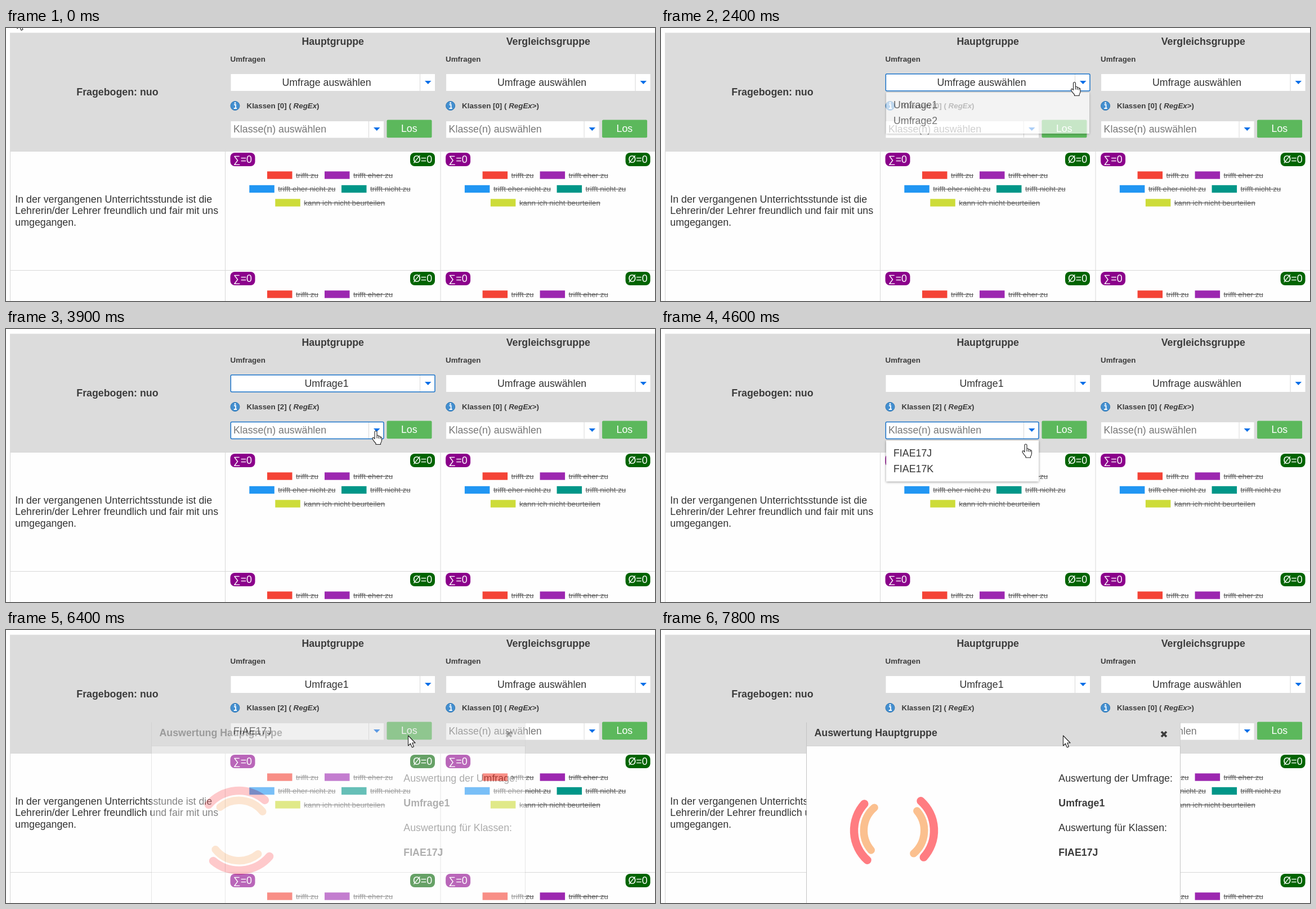
Animation of 1153 by 486 pixels, one loop 8000 ms. Source, as an HTML page:

```html
<!DOCTYPE html>
<html lang="de">
<head>
<meta charset="utf-8">
<style>
  html, body { margin: 0; width: 100%; height: 100%; overflow: hidden; background: #fefefe; }
  svg { display: block; width: 1153px; height: 486px; }
  text { font: 17.8px "Liberation Sans", Arial, sans-serif; fill: #333; white-space: pre; }
  .bold { font-weight: bold; fill: #3c3c3c; }
  .small { font-size: 13.35px; }
  .mid { text-anchor: middle; }
  .white { fill: #fff; }
  .hint { fill: #777; }
  .legend { font-size: 13.35px; fill: #666; }
  .focus { fill: none; stroke: #1a73c9; stroke-width: 1.5; }
  .list > rect:first-child { filter: drop-shadow(0 1px 2px #0006); }
  .cursor { fill: #fff; stroke: #222; stroke-width: 1.1; stroke-linejoin: round; }
  .ring { fill: none; stroke-linecap: round; stroke-dasharray: 1 1; }
</style>
</head>
<body>
<svg id="stage" viewBox="0 0 1153 486"></svg>
<script>
const LOOP = 8000, COLUMN = 382.6, ROW = 212;

const rect = (x, y, w, h, fill, extra = '') =>
  `<rect x="${x}" y="${y}" width="${w}" height="${h}" fill="${fill}" ${extra}/>`;
const text = (x, y, content, cls = '', id = '') =>
  `<text x="${x}" y="${y}" class="${cls}" ${id && `id="${id}"`}>${content}</text>`;
const line = (x1, y1, x2, y2, color = '#d8d8d8') =>
  `<path d="M${x1} ${y1}L${x2} ${y2}" stroke="${color}"/>`;
const group = (x, y, content) => `<g transform="translate(${x} ${y})">${content}</g>`;
const focusBox = (id, x, y, w, h) =>
  `<rect id="${id}" class="focus" x="${x}" y="${y}" width="${w}" height="${h}" rx="2"/>`;

const dropButton = (x, y) =>
  line(x, y - 15, x, y + 15) + `<path d="M${x + 8.5} ${y - 3}h11.5l-5.75 6z" fill="#0a6fe8"/>`;

const badge = (x, color, label) =>
  rect(x, 222, 44, 24, color, 'rx="8"') + text(x + 22, 240, label, 'mid white');

// Each entry: swatch x, row centre, colour, label, label width
const answers = [
  [464, 262, '#f44336', 'trifft zu', 40],
  [566, 262, '#9c27b0', 'trifft eher zu', 70],
  [432.3, 286.5, '#2196f3', 'trifft eher nicht zu', 102],
  [596, 286.5, '#009688', 'trifft nicht zu', 71.5],
  [478.3, 311, '#cddc39', 'kann ich nicht beurteilen', 144],
];
const legend = answers.map(([x, y, color, label, width]) =>
  rect(x, y - 6.7, 44.5, 13.4, color) + text(x + 51, y + 4.5, label, 'legend') +
  rect(x + 51, y - .2, width, 1.3, '#666')).join('');

const cell = badge(398.5, '#8b008b', '∑=0') + badge(718, '#006400', 'Ø=0') + legend;

const panel = (title, key, closing) =>
  text(580.7, 30, title, 'bold mid') +
  text(398.5, 60, 'Umfragen', 'bold small') +
  rect(399.5, 82, 362.5, 30, '#fff') + dropButton(735.5, 97) +
  text(569.5, 102.5, 'Umfrage auswählen', 'mid', 'survey' + key) +
  '<circle cx="407" cy="138.5" r="8" fill="#438fd0" stroke="#2e74b0"/>' +
  '<path d="M405 136.5h3v6.5m-3.2 0h5.2" fill="none" stroke="#fff" stroke-width="1.8"/>' +
  '<circle cx="407" cy="133.4" r="1.4" fill="#fff"/>' +
  text(427.5, 143, `Klassen [<tspan id="count${key}">0</tspan>] ( <tspan font-style="italic">RegEx</tspan>${closing}`, 'bold small') +
  rect(399.5, 166, 271.5, 29.5, '#fff') + dropButton(644.5, 180) +
  text(404, 186.3, 'Klasse(n) auswählen', 'hint', 'class' + key) +
  rect(676.5, 163.5, 80, 31.7, '#5cb85c', 'rx="2"') + text(716.3, 185.2, 'Los', 'mid white');

const list = (id, top, width, items) =>
  `<g id="${id}" class="list">` + rect(400, top, width, 73, '#fff') +
  rect(408, top + 8.5, width - 16, 28, '#e6e6e6', `id="${id}Hover" rx="2"`) +
  items.map((item, i) => text(413, top + 28 + i * 28.3, item)).join('') + '</g>';

const ring = (id, radius, width, color) =>
  `<circle id="${id}" class="ring" r="${radius}" pathLength="4" stroke="${color}" stroke-width="${width}"/>`;

const dialog = '<g id="dialog">' +
  rect(258.5, 165, 664, 340, '#fefefe', 'stroke="#c4c4c4"') +
  rect(259, 163, 663.5, 43, '#dcdcdc') + line(259, 206.5, 922, 206.5, '#d0d0d0') +
  text(272.5, 189, 'Auswertung Hauptgruppe', 'bold') +
  '<path d="M889 181l9 9m0-9l-9 9" stroke="#3c3c3c" stroke-width="3.8"/>' +
  text(706.3, 269.5, 'Auswertung der Umfrage:') + text(706.3, 313.5, 'Umfrage1', 'bold') +
  text(706.3, 357.5, 'Auswertung für Klassen:') + text(706.3, 401.5, 'FIAE17J', 'bold') +
  group(414, 357, ring('outerRing', 71, 14.5, '#ff7c81') + ring('innerRing', 53.7, 13.5, '#fbc08f')) +
  '</g>';

const question = ['In der vergangenen Unterrichtsstunde ist die',
  'Lehrerin/der Lehrer freundlich und fair mit uns', 'umgegangen.'];

document.getElementById('stage').innerHTML =
  rect(0, 0, 1153, 486, '#fefefe') + rect(7, 8.5, 1146, 210.5, '#dcdcdc') +
  [7.5, 389.5, 772].map(x => line(x, 219, x, 486)).join('') +
  line(7, 219.5, 1153, 219.5) + line(7, 431.5, 1153, 431.5) +
  text(125.3, 119.5, 'Fragebogen: nuo', 'bold') +
  question.map((row, i) => text(16.3, 310.5 + i * 20.5, row)).join('') +
  panel('Hauptgruppe', 'A', ')') + group(COLUMN, 0, panel('Vergleichsgruppe', 'B', '&gt;)')) +
  [0, 1].map(c => [0, 1].map(r => group(c * COLUMN, r * ROW, cell)).join('')).join('') +
  focusBox('surveyFocus', 399.3, 81.7, 362.7, 30.3) +
  focusBox('classFocus', 399.3, 165.5, 271.7, 30) +
  list('surveyList', 115, 361, ['Umfrage1', 'Umfrage2']) +
  list('classList', 198.5, 271, ['FIAE17J', 'FIAE17K']) +
  dialog +
  '<path id="arrow" class="cursor" d="M0 0V18L4 14.2L7 21L10 19.7L7.2 13H12.6Z"/>' +
  '<path id="hand" class="cursor" d="M-2 2Q-2 0 0 0T2 2V8Q5 7 5 9.5Q8 8.5 8 11Q10.5 10 10.5 13V17Q10 20 8.5 22V24H0V22Q-4 18 -6 14Q-6 11 -3.5 12.2L-2 14ZM2 8v5M5 9.5v4M8 11v3"/>';

const el = id => document.getElementById(id);

// Tracks hold each value until the next time stamp.
const hold = (track, t) => track.findLast(entry => entry[0] <= t).slice(1);

const cursorTrack = [
  [0, 20, -17, 'arrow'], [500, 240, 150, 'arrow'], [600, 560, 262, 'arrow'],
  [700, 800, 305, 'arrow'], [800, 921, 308, 'arrow'], [1000, 905, 215, 'arrow'],
  [1100, 876, 142, 'arrow'], [1200, 860, 108.5, 'hand'], [1300, 815, 101, 'hand'],
  [1400, 768, 98, 'arrow'], [1500, 742, 97, 'hand'], [1700, 734.5, 96.5, 'hand'],
  [2500, 722, 104, 'hand'], [2600, 706, 118, 'hand'], [2700, 697, 127, 'hand'],
  [2900, 692, 131, 'hand'], [3400, 680, 148, 'hand'], [3500, 664, 166, 'hand'],
  [3700, 659, 175, 'hand'], [3900, 657, 181.5, 'hand'], [4500, 653, 190, 'hand'],
  [4600, 648, 205, 'hand'], [4700, 644, 219, 'hand'], [4900, 642, 226, 'hand'],
  [5000, 641, 229, 'hand'], [5500, 647, 230, 'arrow'], [5700, 667, 215, 'arrow'],
  [5800, 698, 195, 'hand'], [5900, 714, 188, 'hand'], [6400, 714.5, 188, 'arrow'],
];
const opacityTracks = {
  surveyFocus: [[0, 0], [1700, .5], [1800, 1], [4100, 0]],
  classFocus: [[0, 0], [3800, .6], [3900, 1], [6100, 0]],
  surveyList: [[0, 0], [2200, .25], [2400, .66], [2500, .85], [2600, 1], [3300, .5], [3400, 0]],
  surveyListHover: [[0, 0], [2700, .5], [2900, 1]],
  classList: [[0, 0], [4100, .25], [4200, .6], [4300, .9], [4500, 1], [5200, .5], [5300, 0]],
  classListHover: [[0, 0], [4700, .5], [4900, 1]],
  dialog: [[0, 0], [6400, .4], [6500, .85], [6700, 1]],
};
const spinTimes = [0, 6500, 6700, 6900, 7000, 7100, 7200, 7400, 7500, 7700, 7800];

function draw(t) {
  for (const id in opacityTracks) el(id).setAttribute('opacity', hold(opacityTracks[id], t)[0]);

  el('surveyA').textContent = t < 3300 ? 'Umfrage auswählen' : 'Umfrage1';
  el('countA').textContent = t < 3300 ? 0 : 2;
  el('classA').textContent = t < 5200 ? 'Klasse(n) auswählen' : 'FIAE17J';
  el('classA').setAttribute('class', t < 5200 ? 'hint' : '');

  const [x, y, shape] = hold(cursorTrack, t);
  for (const id of ['arrow', 'hand']) {
    el(id).setAttribute('transform', `translate(${x} ${y})`);
    el(id).setAttribute('visibility', id === shape ? 'visible' : 'hidden');
  }

  const turn = (spinTimes.findLast(s => s <= t) - 6900) * .2656;
  el('outerRing').setAttribute('transform', `rotate(${turn - 107})`);
  el('innerRing').setAttribute('transform', `rotate(${18.5 - turn})`);
}

const start = performance.now();
function frame() {
  draw((performance.now() - start) % LOOP);
  requestAnimationFrame(frame);
}
frame();
</script>
</body>
</html>
```
